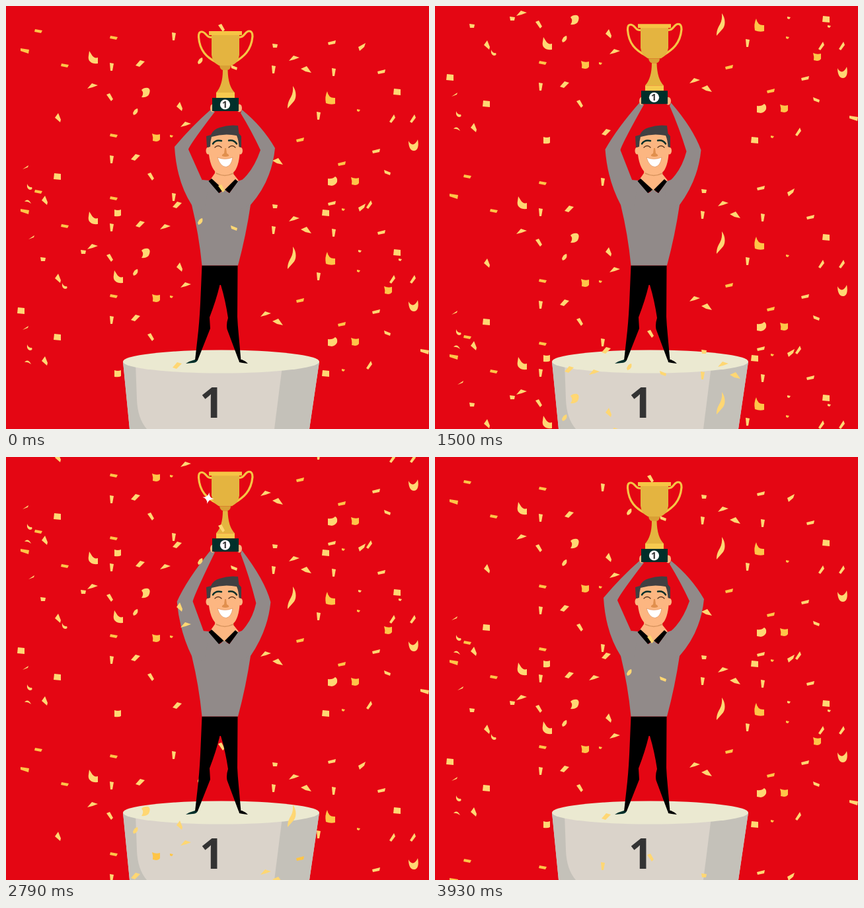
These frames come from a looping animation (640 px wide and 640 px high, 4000 ms). An HTML page:

```html
<!DOCTYPE html>
<html lang="en">
<head>
<meta charset="utf-8">
<title>Winner</title>
<style>
html, body { margin: 0; width: 100%; height: 100%; overflow: hidden; background: #e40613; }
svg { display: block; width: 100vw; height: 100vh; }
text { font-family: "Open Sans", "Noto Sans", sans-serif; font-weight: 700; fill: #333; }
.skin { fill: #fcb681; }
.grey { fill: #918a89; }
.line { fill: none; stroke-linecap: round; }
</style>
</head>
<body>
<svg viewBox="0 0 640 640">
  <defs>
    <g id="shared"></g>
    <g id="backSheet"><use href="#shared"/><g id="backOnly"></g></g>
    <g id="frontSheet"><use href="#shared"/><g id="frontOnly"></g></g>
  </defs>
  <rect width="640" height="640" fill="#e40613"/>

  <g id="podium">
    <path fill="#dad3ca" d="M177 538L187 640H459L474 538Z"/>
    <path fill="#c4c1b9" d="M177 538L187 640H213Q199 624 198 595L196 540Z"/>
    <path fill="#c4c1b9" d="M418 545L406 640H459L474 538Z"/>
    <ellipse cx="325.500" cy="538" rx="148.500" ry="17.500" fill="#ebe9d1"/>
    <text x="293" y="623" font-size="64">1</text>
  </g>

  <use href="#backSheet" data-y="0"/>
  <use href="#backSheet" data-y="-573"/>

  <g id="man">
    <path fill="#002f2a" d="M272 541Q278 537 286 535L290 536Q288 540 282 540Z"/>
    <path d="M352 535L357 535Q362 537 366 541Q357 540 353 539Z"/>
    <path d="M296.500 392.500H350.500L350 470Q350.500 482 352 497L355.500 536H352L334.500 489Q333 481 336 472Q332 445 325 422H323.500Q318 445 308 471L309 488L290 536H286L289.500 505Q292.500 480 294 450Z"/>
    <path class="skin" d="M317 243L316 253L309 263L330 283L352 264L344 254V243Z"/>
    <path class="grey" d="M297 263L308 264L323 283L330 278L338 283L351 265L357 263L370 301Q363 348 351 392.500H296.500Q292 346 281 301Z"/>
    <path id="armL" class="grey"/>
    <path id="armR" class="grey"/>
    <path d="M311 261L329.500 278L322 283L306.500 265ZM347 262L351 265.500L338 283L331 278Z"/>
    <g class="skin">
      <ellipse cx="306" cy="219" rx="3.500" ry="5.500"/>
      <ellipse cx="354.500" cy="219" rx="3.500" ry="5.500"/>
      <path d="M307 198Q330 186 354 198L353.500 225Q351 249 341 254Q331 258 321 254Q310 248 307 225Z"/>
    </g>
    <path class="line" stroke="#d9955f" stroke-width="1.500" d="M318 253Q331 260 344 253"/>
    <path fill="#414042" d="M304 214L303 197L310 195Q313 187 323 184Q337 179 351 181L352.500 193L356 197V214L352.500 213Q352 203 349 196Q330 192 311 198Q309 205 309 213Z"/>
    <path class="line" stroke="#002f2a" stroke-width="2.400" d="M313 208.500Q317 202 326 204M337 203.500Q345 202 349 208.500"/>
    <path class="line" stroke="#5b3520" stroke-width="1.400" d="M316 214Q321 209 326 214M337 214Q342 209 347 214"/>
    <path fill="#e08f4d" d="M331 215H333L334 223Q338 225 337 227Q332 229 327 227Q326 225 330 223Z"/>
    <path fill="#fff" stroke="#d98a55" stroke-width=".6" d="M320 229Q331 234 343 229Q341 242 333 243.500Q324 243 320 229Z"/>
  </g>

  <g id="cup">
    <g class="skin">
      <ellipse cx="312.500" cy="154.500" rx="3.500" ry="6"/>
      <ellipse cx="353" cy="154.500" rx="4" ry="6"/>
    </g>
    <path class="line" stroke="#f6c445" stroke-width="3.200" d="M312 47C303 49 303 39 296 39Q291 39 291.500 47C293 68 304 78 318 85M353 47C361 48 361 38 368 38Q373 38 373 46C371 68 359 77 346 85"/>
    <path fill="#e4b440" d="M311 43H353V74Q352 85 342 90H322Q312 85 311 74Z"/>
    <path fill="#f6c445" d="M307 38H357V44H307Z"/>
    <path fill="#d9a035" d="M323 90H340Q340 96 335 97H328Q324 96 323 90Z"/>
    <path fill="#e4b440" d="M328 97H335.500Q336 121 346 131H318Q328 120 328 97Z"/>
    <path fill="#f6ca4f" d="M318 131H346V139H318Z"/>
    <path fill="#002f2a" d="M312 139H352V159H312Z"/>
    <circle cx="331.500" cy="149" r="7.600" fill="#fff"/>
    <text x="331" y="154" font-size="14" text-anchor="middle">1</text>
    <g id="stars"></g>
  </g>

  <use href="#frontSheet" data-y="243"/>
  <use href="#frontSheet" data-y="-330"/>
</svg>
<script>
const $ = id => document.getElementById(id);
const add = (parent, name, attrs) => {
  const el = document.createElementNS('http://www.w3.org/2000/svg', name);
  for (const k in attrs) el.setAttribute(k, attrs[k]);
  return parent.appendChild(el);
};
const LIGHT = '#ffd773', DEEP = '#fec548';
const shapes = {
  fall: 'M-5-3L6-1L4 3L-6 1Z',
  wide: 'M-6-4L7-2L6 4L-6 0Z',
  rise: 'M-6 0L6-3L5 2L-5 4Z',
  steep: 'M-7 3L0-5L7-3L-1 5Z',
  climb: 'M-5 0L6-6L4 0L-3 6Z',
  tall: 'M-3-6L3-5L1 6L-2 6Z',
  slant: 'M-5-4L0-6L5 3L2 6Z',
  slip: 'M-5-4L5 0L4 4L-4 1Z',
  kite: 'M0-7L4 3L3 7L-5 0Z',
  kiteR: 'M3-7L5-2L-1 6L-4 4Z',
  peak: 'M-8 3L-1-5L8-2L0 1Z',
  wedge: 'M-8-1L1-5L8 5L-1 3Z',
  square: 'M-5-5L5-4L5 5L-6 4Z',
  pad: 'M-5-5Q0-3 5-5V4Q2 6-5 5Z',
  chip: 'M-4-3L4-2L3 3L-3 3Z',
  curl: 'M-6-10C-2-4 0 2 7 0V9C-2 10-9 6-7-3Z',
  scoop: 'M-5-11Q-3 0 7-1V8Q0 10-7 7Q-9-3-5-11Z',
  bowl: 'M-7-7C-3 1 3 0 7-9C9 1 7 8 1 8C-4 8-7 2-7-7Z',
  flag: 'M-6-4Q-2-8 4-7Q8-5 6 1Q4 8-6 7Q-3 3-4-1Z',
  banner: 'M-7-4Q0-3 4-7Q8-5 7 1Q5 6-1 7L-7 6Z',
  shield: 'M-6-6Q0-3 6-5V3Q4 6 0 6L-5 5Q-4 0-6-6Z',
  leaf: 'M-4 2Q-2-4 3-5Q5 0 0 4L-3 5Z',
  ribbon: 'M2-16C8-8 8 4 2 9L-6 18C-6 10-4 6-1 1Q3-6 2-16Z',
  hook: 'M-4-5Q-2 1 3 0Q5 4 0 4Q-5 3-4-5Z',
  arc: 'M-5 0Q0-6 5 3Q0-1-5 0Z',
  thin: 'M-5 3L4-3L3 0Z',
  dot: 'M-2-2L3-1L1 2L-2 1Z'
};
const scatter = (id, kind, color, ...spots) => spots.forEach(([x, y]) =>
  add($(id), 'path', { d: shapes[kind], fill: color, transform: `translate(${x} ${y})` }));

const put = (...args) => scatter('shared', ...args);
put('fall', DEEP, [49, 38], [89, 90], [163, 48], [163, 196]);
put('wide', DEEP, [28, 68]);
put('rise', LIGHT, [493, 55], [568, 99], [560, 219]);
put('rise', DEEP, [445, 202], [508, 238]);
put('steep', LIGHT, [203, 87], [196, 229], [259, 301]);
put('climb', LIGHT, [538, 62]);
put('tall', LIGHT, [160, 92], [254, 46], [160, 232], [405, 96], [496, 100], [473, 166]);
put('slant', LIGHT, [157, 138], [219, 258], [326, 33]);
put('slip', LIGHT, [345, 93], [577, 252]);
put('kite', LIGHT, [79, 169], [263, 152], [59, 294]);
put('kiteR', LIGHT, [584, 171], [615, 171], [549, 301]);
put('peak', LIGHT, [131, 122], [436, 80], [272, 180], [393, 224]);
put('wedge', LIGHT, [454, 96], [411, 235]);
put('square', LIGHT, [78, 258], [592, 130], [484, 313]);
put('pad', LIGHT, [169, 313]);
put('curl', LIGHT, [132, 78]);
put('scoop', DEEP, [491, 140]);
put('bowl', LIGHT, [616, 211]);
put('flag', LIGHT, [211, 131]);
put('banner', LIGHT, [494, 265]);
put('shield', DEEP, [227, 199], [528, 265]);
put('leaf', LIGHT, [196, 160], [294, 83]);
put('ribbon', LIGHT, [432, 137]);
put('hook', LIGHT, [36, 274]);
put('arc', LIGHT, [33, 296]);
put('thin', LIGHT, [30, 244]);
put('chip', LIGHT, [407, 60]);
put('dot', DEEP, [250, 197], [533, 158], [510, 308]);

const back = (...args) => scatter('backOnly', ...args);
back('thin', LIGHT, [39, 350]);
back('chip', LIGHT, [56, 383], [117, 372]);
back('peak', LIGHT, [241, 335]);
back('dot', LIGHT, [535, 371], [596, 384]);
back('hook', LIGHT, [89, 424]);
back('square', LIGHT, [23, 461]);
back('shield', DEEP, [578, 430]);
back('curl', LIGHT, [170, 410]);
scatter('frontOnly', 'wide', LIGHT, [633, 280]);

// x, y on the cup, first step, largest scale
const stars = [[299, 42, 6.5, .8], [339.5, 132, 11, 1.1], [352, 41, 24.5, .8], [306, 78, 35, 1.1]]
  .map(([x, y, start, size]) => ({ x, y, start, size, el: add($('stars'), 'path', {
    d: 'M0-9Q1-1 9 0Q1 1 0 9Q-1 1-9 0Q-1-1 0-9Z', fill: '#fff' }) }));
const sheets = [...document.querySelectorAll('[data-y]')];

const mix = (a, b, k) => a + (b - a) * k;
const along = (keys, x) => {
  const n = keys.findIndex(key => key[0] > x);
  if (n < 0) return keys[keys.length - 1][1];
  const [[x0, y0], [x1, y1]] = [keys[n - 1], keys[n]];
  return mix(y0, y1, (x - x0) / (x1 - x0));
};
const FALL = [[0, 0], [8, 87], [16, 168], [26, 272], [34, 353], [44, 457], [55, 573]];
const LIFT = [[0, 0], [15, 21.5], [16, 21.5], [26, 0]];

function drawArms(up) {
  const k = up / 21.5, m = (a, b) => mix(a, b, k);
  $('armL').setAttribute('d',
    `M309.500 ${157 - up}Q${m(281, 270)} ${m(182, 188)} ${m(255, 260)} ${m(213, 221)}` +
    `Q${m(258, 264)} ${m(265, 262)} 281 301L300 310L308 264L${m(297, 300)} 264` +
    `L${m(276, 285)} ${m(217, 219)}Q${m(277, 287)} ${m(211, 209)} 316 ${160 - up}Z`);
  $('armR').setAttribute('d',
    `M357 ${157 - up}Q${m(388, 393)} ${m(182, 188)} ${m(407, 398)} ${m(215, 221)}` +
    `Q${m(402, 394)} ${m(265, 262)} 370 301L350 310L348 266L355 265` +
    `Q${m(374, 372)} ${m(250, 247)} ${m(385, 376)} ${m(218, 222)}Q${m(372, 367)} ${m(190, 178)} 355 ${162 - up}Z`);
}

function draw(ms) {
  const step = Math.min(55, Math.floor((ms % 4000 + 5) * 14 / 1000));
  const fall = along(FALL, step), up = along(LIFT, step % 28);
  sheets.forEach(el => el.setAttribute('transform', `translate(0 ${fall + +el.dataset.y})`));
  $('cup').setAttribute('transform', `translate(0 ${-up})`);
  drawArms(up);
  for (const { x, y, start, size, el } of stars) {
    const u = (step - start) / 10;
    const on = u > 0 && u < 1;
    el.setAttribute('opacity', on ? Math.min(1, (1 - u) * 3) : 0);
    el.setAttribute('transform',
      `translate(${x} ${y}) rotate(${u * 25}) scale(${on ? size * Math.min(1, .4 + u * 1.2) : 0})`);
  }
}

const begin = performance.now();
function tick() {
  draw(performance.now() - begin);
  requestAnimationFrame(tick);
}
tick();
</script>
</body>
</html>
```
